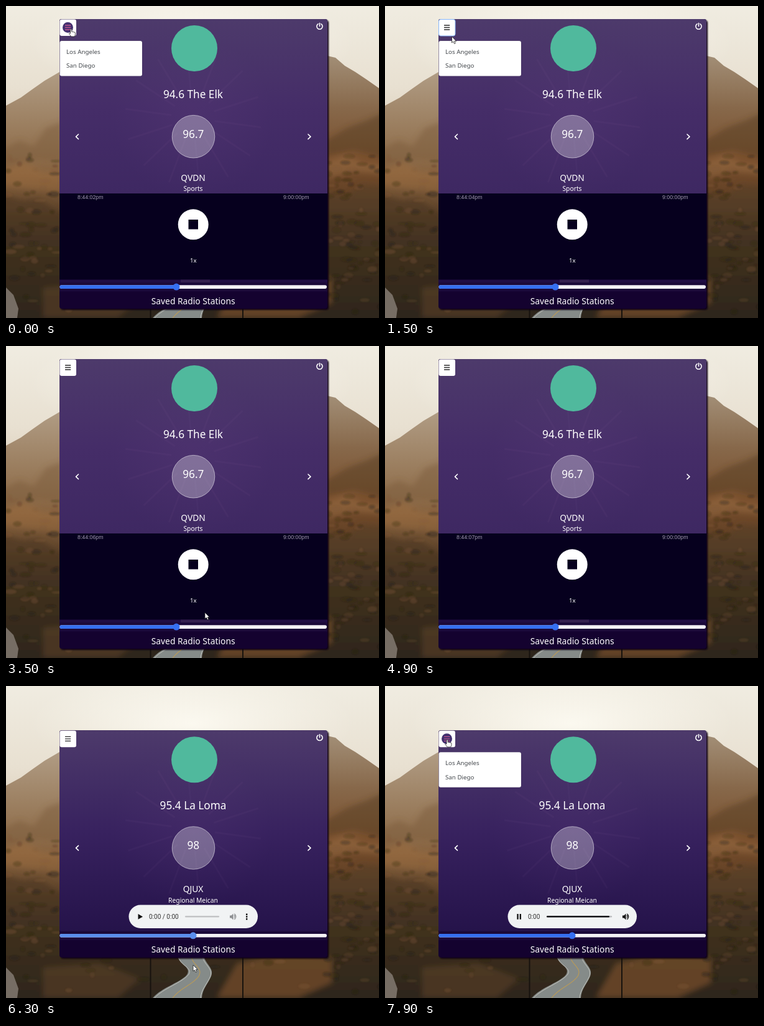
An HTML page for the animation above (8 s loop, 600 by 501 pixels).

```html
<!DOCTYPE html>
<html lang="en">
<head>
<meta charset="utf-8">
<title>Radio tuner</title>
<style>
  html, body { margin: 0; width: 100%; height: 100%; overflow: hidden; background: #e9e2d4; }
  svg { display: block; width: 100vw; height: 100vh; }
  text { font-family: "Noto Sans", "Open Sans", sans-serif; fill: #fff; }
  .mid { text-anchor: middle; }
  .clock { font: 8.8px "Liberation Sans", Arial, sans-serif; fill: #9e98ad; }
  .player { font: 10px Roboto, sans-serif; fill: #333; }
  .item { font-size: 9.75px; fill: #45494e; }
  .item.on { fill: #1e2125; }
  .line { fill: none; stroke: #fff; stroke-width: 1.6; stroke-linecap: round; stroke-linejoin: round; }
</style>
</head>
<body>
<svg viewBox="0 0 600 501" preserveAspectRatio="none">
  <defs>
    <linearGradient id="sky" x2="0" y2="1">
      <stop stop-color="#f0ece1"/><stop offset=".5" stop-color="#e8e0d1"/><stop offset="1" stop-color="#d3c2a9"/>
    </linearGradient>
    <radialGradient id="haze">
      <stop stop-color="#fffdf5" stop-opacity=".8"/><stop offset="1" stop-color="#fffdf5" stop-opacity="0"/>
    </radialGradient>
    <linearGradient id="far" x2="0" y2="1">
      <stop stop-color="#b09c84"/><stop offset=".25" stop-color="#987a5a"/><stop offset=".42" stop-color="#86623f"/><stop offset=".6" stop-color="#553c25"/><stop offset="1" stop-color="#30271b"/>
    </linearGradient>
    <linearGradient id="farRight" x2="0" y2="1">
      <stop stop-color="#a28e76"/><stop offset=".2" stop-color="#87684a"/><stop offset=".4" stop-color="#794f2d"/><stop offset=".6" stop-color="#563a22"/><stop offset="1" stop-color="#33261a"/>
    </linearGradient>
    <linearGradient id="near" x2="0" y2="1">
      <stop stop-color="#5f4329"/><stop offset=".4" stop-color="#433220"/><stop offset="1" stop-color="#2b251a"/>
    </linearGradient>
    <linearGradient id="panelFill" x2="0" y2="1">
      <stop stop-color="#4d3a6b"/><stop id="stopMid" offset=".5"/><stop id="stopEnd" offset="1"/>
    </linearGradient>
    <radialGradient id="glow">
      <stop stop-color="#8a5aa0" stop-opacity=".1"/><stop offset="1" stop-color="#8a5aa0" stop-opacity="0"/>
    </radialGradient>
    <filter id="soft"><feGaussianBlur stdDeviation="4"/></filter>
    <filter id="shade" x="-5%" y="-5%" width="110%" height="110%"><feGaussianBlur stdDeviation="1"/></filter>
  </defs>

  <g id="scenery">
    <rect width="600" height="260" fill="url(#sky)"/>
    <ellipse cx="300" cy="60" rx="260" ry="90" fill="url(#haze)"/>
    <path fill="url(#far)" d="M0 160 24 147 42 134 62 120 86 106 180 130 300 190V501H0Z"/>
    <path fill="url(#farRight)" d="M300 190 420 120 517 80 530 83 545 96 562 106 580 118 600 132V501H300Z"/>
    <g filter="url(#soft)">
      <path fill="#7d5d3f" opacity=".5" d="M-9 232 22 216 44 226 64 196 90 186V250L50 246-9 270Z"/>
      <path fill="#a06f40" opacity=".4" d="M-9 262 30 250 60 268 90 266V300L40 294-9 288Z"/>
      <path fill="#573d26" opacity=".5" d="M610 170 580 184 548 196 515 216V240L560 232 610 246Z"/>
      <path fill="#a87c50" opacity=".35" d="M515 250 548 240 574 252 610 256V270L560 266 515 276Z"/>
      <path fill="url(#near)" d="M-12 300 26 312 54 310 90 334 200 380 300 410 430 370 516 300 548 306 572 286 612 290V515H-12Z"/>
      <path fill="#704a2b" opacity=".8" d="M372 446 440 430 524 436V476L470 500H340Z"/>
      <path fill="#62452b" opacity=".5" d="M60 452 150 446 215 470 180 500H60Z"/>
    </g>
    <g id="brush" filter="url(#shade)"></g>
    <path fill="#766d64" d="M0 452 12 464 20 486 18 501H0Z"/>
    <path fill="#858b89" d="M276 430H318C318 446 336 452 330 466 324 480 316 486 315 501H236C250 484 286 474 292 462 298 450 274 446 276 430Z"/>
    <path fill="none" stroke="#b99a58" stroke-width="1.2" d="M297 430C298 448 318 452 310 466 301 480 280 484 268 501"/>
    <path fill="none" stroke="#cfcdc4" stroke-width=".8" d="M278 434C278 448 301 452 294 463 284 476 252 486 239 501M316 434C318 448 335 454 328 468 322 480 314 488 313 501"/>
    <path fill="none" stroke="#17120e" stroke-width="2" d="M232.500 420V501M381 420V501"/>
  </g>

  <rect id="shadow" x="88" rx="4" width="431" fill="#0b0616" filter="url(#shade)"/>
  <rect id="panel" x="86" width="431" rx="4" fill="#14022f"/>
  <rect id="upper" x="86" width="431" rx="3" fill="url(#panelFill)"/>

  <g id="head">
    <circle cx="301" cy="180" r="130" fill="url(#glow)"/>
    <g id="rays" stroke="#b590c4" stroke-opacity=".035" stroke-width="3"></g>
    <circle cx="303" cy="68" r="37" fill="#50b99d"/>
    <path class="line" d="M502 28.800A4.600 4.600 0 1 0 507 28.800M504.500 27.500V32.500"/>
    <text id="station" class="mid" x="301" y="147.500" font-size="17.200"></text>
    <circle cx="301.500" cy="209.700" r="34.300" fill="#fff" fill-opacity=".3" stroke="#fff" stroke-opacity=".5"/>
    <text id="dial" class="mid" x="301.300" y="211.800" font-size="17.200"></text>
    <path class="line" d="M116.500 206 112.500 209.800 116.500 213.600M486 206 490 209.800 486 213.600"/>
    <text id="callSign" class="mid" x="301" y="280.500" font-size="13.800"></text>
    <text id="genre" class="mid" x="301" y="297.300" font-size="10.300"></text>
  </g>

  <g id="live">
    <rect x="86" y="301" width="431" height="138.500" fill="#06001e"/>
    <rect x="86" y="439.500" width="431" height="5.500" fill="#200d43"/>
    <rect x="281" y="439.500" width="47" height="5.500" fill="#34204f"/>
    <text id="now" class="clock" x="115" y="310"></text>
    <text class="clock" x="487.500" y="310" text-anchor="end">9:00:00pm</text>
    <circle cx="301.200" cy="350.800" r="24.500" fill="#fff"/>
    <rect x="293.500" y="343" width="15.500" height="15.500" fill="#06001e"/>
    <text class="mid" x="301.200" y="411.500" font-size="9.500">1x</text>
  </g>

  <g id="audio">
    <rect x="197.500" y="351.500" width="207.500" height="37.500" rx="18.750" fill="#f1f3f4"/>
    <g id="idle">
      <path d="M212.500 366V374.800L220 370.400Z" fill="#111"/>
      <text class="player" x="230" y="373.700">0:00 / 0:00</text>
      <rect x="288" y="369.100" width="55" height="2.400" rx="1.200" fill="#c3c4c6"/>
      <path d="M387.200 365.500V375.500" stroke="#111" stroke-width="2.400" stroke-dasharray="2.400 1.400"/>
    </g>
    <g id="playing">
      <path d="M213.500 366V374.800M217.800 366V374.800" stroke="#111" stroke-width="2.300"/>
      <text class="player" x="230" y="373.700">0:00</text>
      <rect x="260" y="369" width="105" height="2.600" rx="1.300" fill="#b9babd"/>
      <rect x="260" y="369" width="101" height="2.600" rx="1.300" fill="#16161a"/>
    </g>
    <g id="speaker">
      <path d="M0 -2H2.500L5.500 -5V5L2.500 2H0Z" stroke="none"/>
      <path d="M7 -2.400Q9 0 7 2.400M7.400 -4.600Q12.200 0 7.400 4.600" fill="none" stroke-width="1.200"/>
    </g>
  </g>

  <g id="foot">
    <rect x="86" y="444" width="431" height="14.500" fill="#1b0939"/>
    <rect x="86.500" y="448.300" width="429.500" height="5.600" rx="2.800" fill="#f3f1f5"/>
    <rect id="fill" x="86.500" y="448.300" height="5.600" rx="2.800"/>
    <circle id="thumb" cy="451.100" r="5.500"/>
    <text class="mid" x="301.200" y="478.700" font-size="13.800">Saved Radio Stations</text>
  </g>

  <g id="menuBar">
    <rect id="button" x="86.500" y="21.500" width="26.500" height="26.500" rx="3" fill="#fff"/>
    <circle id="disc" cx="99.500" cy="34.500" r="8.500" fill="#43306f"/>
    <path id="bars" fill="none" stroke-width="1.300" d="M95 31H104.200M95 34.500H104.200M95 38H104.200"/>
    <g id="menu">
      <rect x="86.500" y="56" width="132.500" height="56.500" rx="3" fill="#fff" stroke="#000" stroke-opacity=".15" stroke-width=".6"/>
      <rect id="rowMark" x="87" width="131.500" height="22" fill="#eff1f2"/>
      <text id="city0" class="item" x="97" y="76.500">Los Angeles</text>
      <text id="city1" class="item" x="97" y="99.300">San Diego</text>
    </g>
  </g>

  <g id="cursor">
    <path id="arrow" d="M0 0V10L2.300 8 4 11.600 5.800 10.800 4.200 7.400H7.200Z" fill="#fff" stroke="#222" stroke-width=".8"/>
    <path id="hand" d="M-.5 .8Q.7 -.8 1.700 .8V4.400Q3 3.500 3.800 4.800 5 4 5.700 5.200 7.200 4.700 7.400 6.200V9Q7 10.500 6.200 12H.8Q-1 9.500 -2.800 7.400 -2.500 6 -.5 7.200Z" fill="#fff" stroke="#222" stroke-width=".8"/>
  </g>
</svg>
<script>
const LOOP = 8000, RETUNE = 5950;
const el = Object.fromEntries([...document.querySelectorAll("[id]")].map(n => [n.id, n]));
const set = (node, attrs) => { for (const k in attrs) node.setAttribute(k, attrs[k]); };
const show = (node, on) => set(node, { visibility: on ? "inherit" : "hidden" });
const move = (node, x, y) => set(node, { transform: `translate(${x} ${y})` });
const add = (parent, tag, attrs) =>
  set(parent.appendChild(document.createElementNS("http://www.w3.org/2000/svg", tag)), attrs);

const stations = [
  { station: "94.6 The Elk", dial: "96.7", callSign: "QVDN", genre: "Sports", mid: "#452d68", end: "#3e2862" },
  { station: "95.4 La Loma", dial: "98", callSign: "QJUX", genre: "Regional Meican", mid: "#38225f", end: "#25134a" }
];

// time, x, y of the pointer tip
const pointerPath = [
  [0, 104, 37], [900, 104, 37], [1400, 107.5, 49], [1800, 107.5, 49], [2400, 132.5, 73],
  [2900, 132.5, 73], [3450, 320, 428], [4000, 320, 428], [5100, 275, 448],
  [5400, 275, 448], [5900, 301, 448], [6500, 301, 448], [7200, 99.5, 86], [8000, 99.5, 86]
];
const thumbPath = [[0, 274], [5400, 274], [5900, 301], [8000, 301]];

function at(keys, t) {
  const i = Math.max(1, keys.findIndex(k => k[0] > t));
  const a = keys[i - 1], b = keys[i];
  const u = (t - a[0]) / (b[0] - a[0]), e = u * u * (3 - 2 * u);
  return a.slice(1).map((v, n) => v + (b[n + 1] - v) * e);
}

function buildScenery() {
  let seed = 11;
  const rnd = () => (seed = seed * 16807 % 2147483647) / 2147483647;
  for (let i = 0; i < 150; i++) {
    const y = 240 + 255 * rnd(), side = rnd() * 86;
    const x = y > 440 && rnd() < .6 ? rnd() * 600 : rnd() < .5 ? side : 516 + side;
    add(el.brush, "ellipse", {
      cx: x, cy: y, rx: 3 + 7 * rnd(), ry: 2 + 3 * rnd(),
      fill: rnd() < .65 ? "#211c13" : "#80583a", opacity: .15 + .2 * rnd()
    });
  }
  for (let i = 0; i < 14; i++) {
    const a = Math.PI * 2 * (i + .3) / 14, c = Math.cos(a), s = Math.sin(a);
    add(el.rays, "line", { x1: 301 + 35 * c, y1: 180 + 35 * s, x2: 301 + 110 * c, y2: 180 + 110 * s });
  }
}

function render(t) {
  const tuned = t >= RETUNE, dy = tuned ? 50.3 : 0;
  const info = stations[+tuned];
  for (const key of ["station", "dial", "callSign", "genre"]) el[key].textContent = info[key];
  set(el.stopMid, { "stop-color": info.mid });
  set(el.stopEnd, { "stop-color": info.end });
  set(el.panel, { y: 21 + dy, height: 465 - 2 * dy });
  set(el.shadow, { y: 23 + dy, height: 465 - 2 * dy });
  set(el.upper, { y: 21 + dy, height: tuned ? 323 : 282 });
  move(el.head, 0, dy);
  move(el.menuBar, 0, dy);
  move(el.foot, 0, -dy);
  show(el.live, !tuned);
  show(el.audio, tuned);
  el.now.textContent = `8:44:0${Math.floor(2.7 + t / 1000)}pm`;

  const playing = t >= 6900;
  show(el.idle, tuned && !playing);
  show(el.playing, playing);
  const tone = playing ? "#111" : "#8c8e91";
  set(el.speaker, { fill: tone, stroke: tone });
  move(el.speaker, playing ? 382 : 360, 370.4);

  const [tx] = at(thumbPath, t);
  const blue = t >= 5400 && t < 6500 ? "#5a8eec" : "#356ff0";
  set(el.fill, { width: tx - 86.5, fill: blue });
  set(el.thumb, { cx: tx, fill: blue });

  const [x, y] = at(pointerPath, t), ly = y - dy;
  const open = t < 2900 || t >= 7500;
  const overButton = x > 86 && x < 113 && ly > 21 && ly < 48;
  const row = open && x > 86 && x < 219 && ly > 62 && ly < 107 ? +(ly > 84) : -1;
  show(el.disc, overButton);
  set(el.bars, { stroke: overButton ? "#c0568f" : "#2c2c2e" });
  set(el.button, { stroke: t < 1900 && !overButton ? "#86b7fe" : "none" });
  show(el.menu, open);
  show(el.rowMark, row >= 0);
  set(el.rowMark, { y: row === 1 ? 84 : 62 });
  [el.city0, el.city1].forEach((n, i) => n.classList.toggle("on", i === row));

  const hand = overButton || row >= 0;
  move(el.cursor, x, y);
  show(el.cursor, t < 4200 || t > 5100);
  show(el.hand, hand);
  show(el.arrow, !hand);
}

buildScenery();
const start = performance.now();
function tick() {
  render((performance.now() - start) % LOOP);
  requestAnimationFrame(tick);
}
tick();
</script>
</body>
</html>
```
